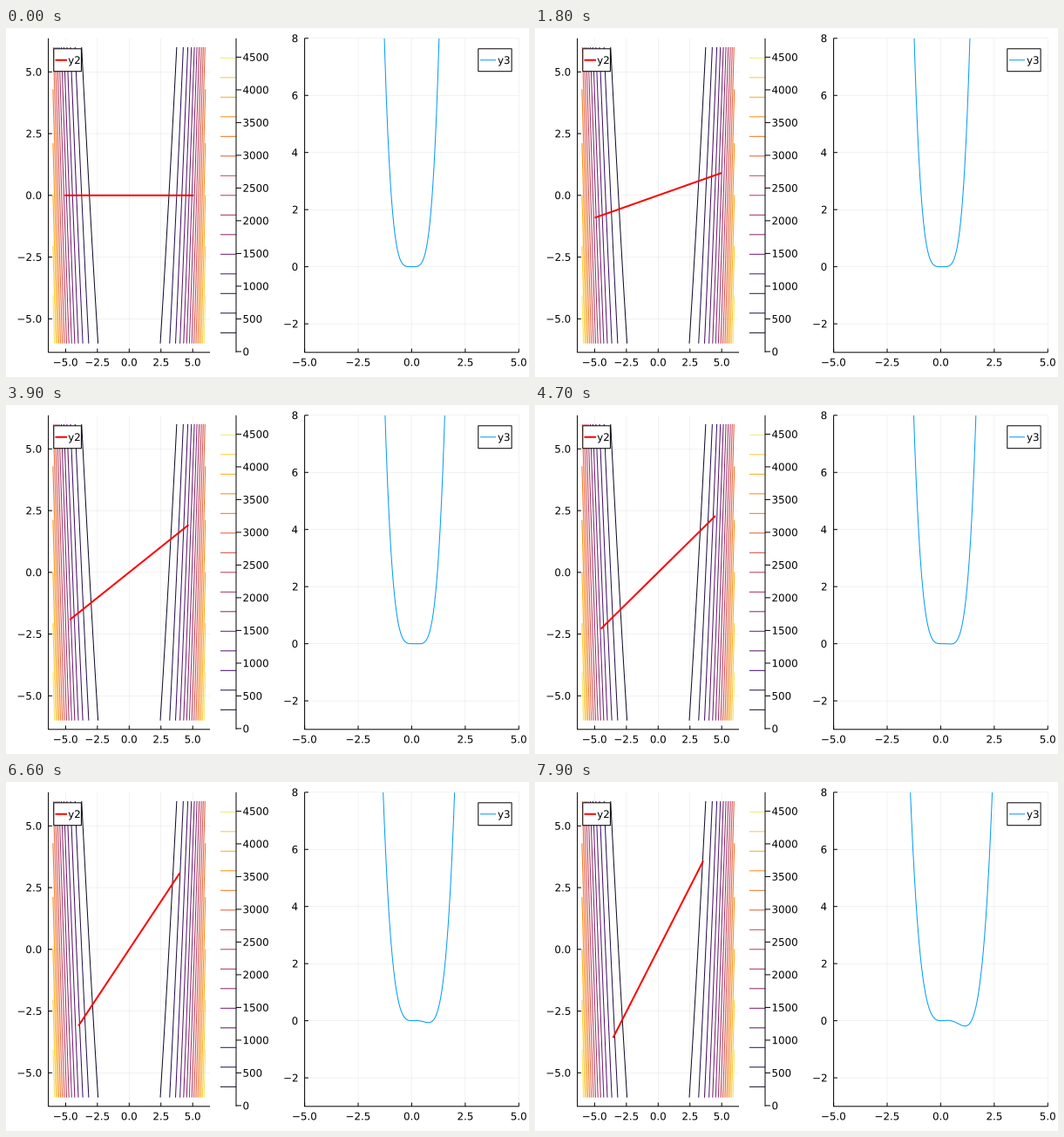
A matplotlib script for the animation above (8 s loop, 600 by 400 pixels).

```python
import numpy as np
import matplotlib.pyplot as plt
from matplotlib.animation import FuncAnimation
from matplotlib.patches import PathPatch, Rectangle
from matplotlib.textpath import TextPath
from matplotlib.transforms import Affine2D

W, H, DPI = 600, 400, 100
PX = 72 / DPI  # one pixel in points
FRAMES, STEP_MS = 80, 100
TOP, BOTTOM = 11.8, 371.8
FONT_PX = 11.85
CAP = 0.729 * FONT_PX  # height of digits
TICK = 4.3
RED, BLUE = "#ff0000", "#009afa"

plt.rcParams.update({
    "font.family": "DejaVu Sans",
    "lines.solid_capstyle": "butt",
    "lines.linewidth": PX,
    "path.snap": False,
})

# The whole stage is one axes in pixel coordinates, y pointing down
fig = plt.figure(figsize=(W / DPI, H / DPI), dpi=DPI, facecolor="white")
stage = fig.add_axes([0, 0, 1, 1])
stage.set(xlim=(0, W), ylim=(H, 0), autoscale_on=False)
stage.axis("off")


class Panel:
    """Maps data coordinates to a pixel box."""

    def __init__(self, left, right, xlim, ylim):
        self.left, self.right = left, right
        self.xlim, self.ylim = xlim, ylim

    def x(self, v):
        a, b = self.xlim
        return self.left + (v - a) / (b - a) * (self.right - self.left)

    def y(self, v):
        a, b = self.ylim
        return BOTTOM - (v - a) / (b - a) * (BOTTOM - TOP)


def surface(x, y):
    return (y - x**2) * (y - 3 * x**2)


def line(xs, ys, color="black", **style):
    return stage.plot(xs, ys, color=color, **style)[0]


def label(text, x, mid, align=0.0):
    """Text centred on height mid; align 0 is left, 0.5 centre, 1 right."""
    path = TextPath((0, 0), text.replace("-", "\u2212"), size=FONT_PX)
    if align:
        box = path.get_extents()
        x -= box.x0 + align * box.width
    place = Affine2D().scale(1, -1).translate(x, mid + CAP / 2)
    stage.add_patch(PathPatch(place.transform_path(path), fc="black", lw=0, zorder=7))


def draw_frame(panel, xticks, yticks, yformat):
    grid = dict(alpha=0.1, lw=0.5 * PX, zorder=1)
    for v in xticks:
        x = panel.x(v)
        line([x, x], [TOP, BOTTOM], **grid)
        line([x, x], [BOTTOM, BOTTOM - TICK])
        label(f"{v:.1f}", x, 383, 0.5)
    for v in yticks:
        y = panel.y(v)
        line([panel.left, panel.right], [y, y], **grid)
        line([panel.left, panel.left + TICK], [y, y])
        label(format(v, yformat), panel.left - 8.2, y, 1)
    line([panel.left, panel.left, panel.right], [TOP, BOTTOM, BOTTOM])


def draw_legend(box, dash, text_x, text, color, width):
    top, height = TOP + 12, 3 * CAP
    mid = top + height / 2
    stage.add_patch(Rectangle((box[0], top), box[1] - box[0], height,
                              fc="white", ec="black", lw=PX, zorder=5))
    line(dash, [mid, mid], color, lw=width * PX, zorder=6)
    label(text, text_x, mid)


# Contour map
span = 6.36
ticks = np.arange(-5, 5.1, 2.5)
plane = Panel(48.6, 234, (-span, span), (-span, span))
draw_frame(plane, ticks, ticks, ".1f")

grid = np.linspace(-6, 6, 241)
X, Y = np.meshgrid(grid, grid)
Z = surface(X, Y)
z_min, z_max = Z.min(), Z.max()
levels = np.linspace(z_min, z_max, 17)[1:-1]
colors = plt.get_cmap("inferno")(np.arange(1, 16) / 16)
stage.contour(plane.x(X), plane.y(Y), Z, levels=levels, colors=colors,
              linewidths=PX, zorder=3)
stage.set(xlim=(0, W), ylim=(H, 0))

# Level scale
bar = Panel(246, 264, (0, 1), (z_min, z_max))
for level, color in zip(levels, colors):
    line([bar.left, bar.right], [bar.y(level)] * 2, color)
line([bar.right] * 2, [TOP, BOTTOM])
for v in range(0, 4501, 500):
    line([bar.right, bar.right + 6], [bar.y(v)] * 2)
    label(str(v), bar.right + 7.5, bar.y(v))

# Cross-section along the rotating line
profile = Panel(342.6, 588.3, (-5, 5), (-3, 8))
draw_frame(profile, ticks, range(-2, 9, 2), "d")

draw_legend((54.8, 86.4), (56.5, 70), 71.2, "y2", RED, 2)
draw_legend((541.8, 580.1), (544, 562), 564, "y3", BLUE, 1)

segment = line([], [], RED, lw=2 * PX, zorder=4, solid_capstyle="projecting")
section = line([], [], BLUE, zorder=4)
section.set_clip_path(Rectangle((profile.left, TOP), profile.right - profile.left,
                                BOTTOM - TOP, transform=stage.transData))

t = np.linspace(-5, 5, 1001)


def update(i):
    angle = 0.01 * i
    x, y = t * np.cos(angle), t * np.sin(angle)
    segment.set_data(plane.x(x[[0, -1]]), plane.y(y[[0, -1]]))
    section.set_data(profile.x(t), profile.y(surface(x, y)))
    return segment, section


anim = FuncAnimation(fig, update, frames=FRAMES, interval=STEP_MS,
                     repeat=True, repeat_delay=0, blit=False)
plt.show()
```
